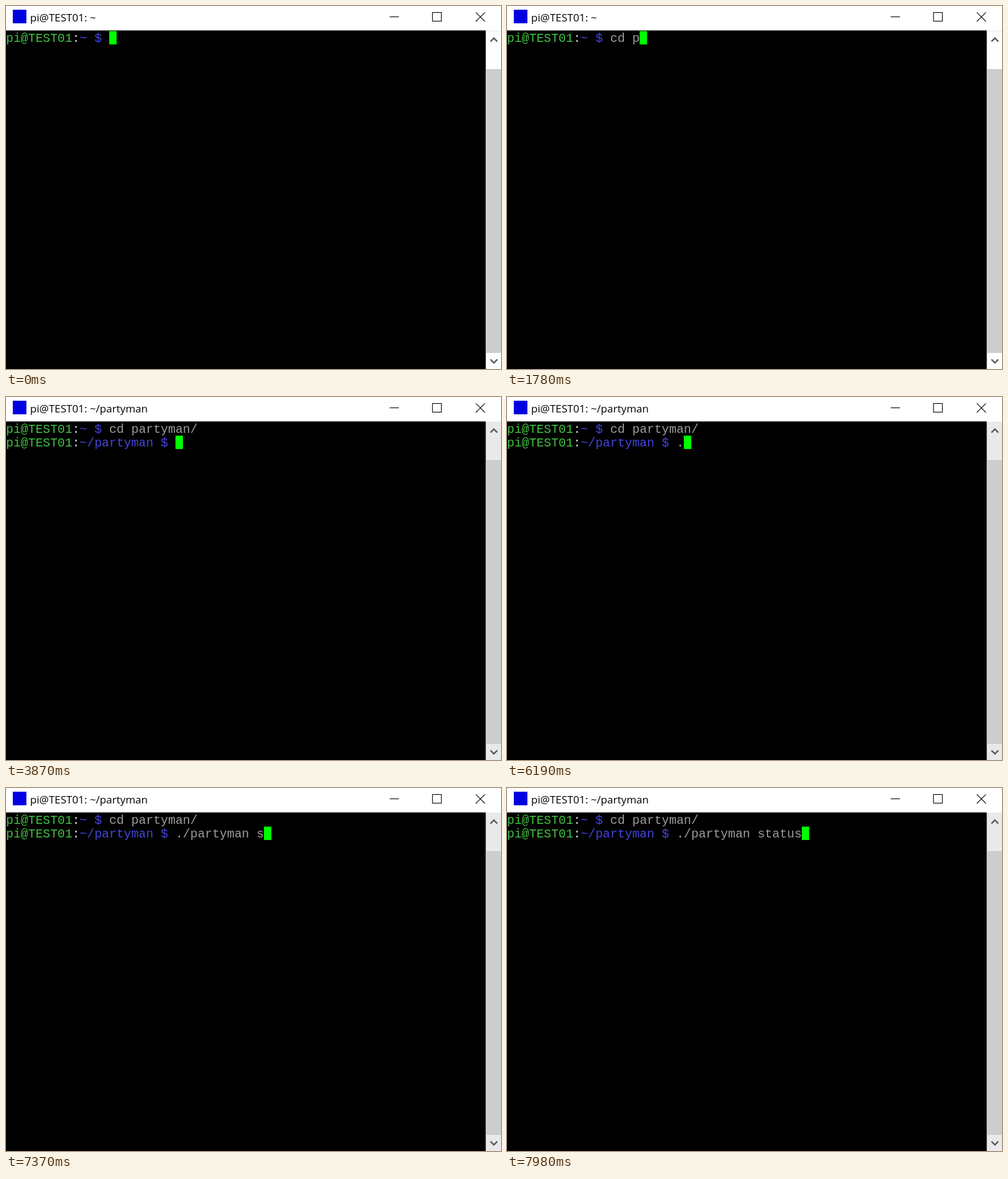
Animation, 800 px wide and 587 px high, one loop 8000 ms. Source, as an HTML page:

```html
<!DOCTYPE html>
<html lang="en">
<head>
<meta charset="utf-8">
<title>Terminal session</title>
<style>
  html, body { margin: 0; width: 100%; height: 100%; overflow: hidden; background: #fff; }
  svg { display: block; width: 800px; height: 587px; }
  text { white-space: pre; }
  .title { font: 17.1px "Open Sans", "Noto Sans", sans-serif; }
  .term { font: 19.85px "Liberation Mono", "Courier New", monospace; }
  .user { fill: #42c442; }
  .colon { fill: #d0d0d0; }
  .path { fill: #4444de; }
  .typed { fill: #9c9c9c; }
</style>
</head>
<body>
<svg viewBox="0 0 800 587">
  <rect width="800" height="587" fill="#fff"/>
  <rect x="11" y="6" width="22" height="22" fill="#0000e0"/>
  <text id="title" class="title" x="39" y="25"></text>
  <g fill="none" stroke="#000" stroke-width="1.1">
    <path d="M620 17.5H635"/>
    <rect x="689.3" y="10.5" width="14.3" height="14"/>
    <path d="M759.3 10.3L774 25M774 10.3L759.3 25"/>
  </g>
  <rect y="39.5" width="775.4" height="547.5"/>
  <rect id="track" x="776" y="40" width="24" height="547"/>
  <path d="M775.5 40.5H800" stroke="#e6e6e6"/>
  <rect x="776.3" y="102" width="23.7" height="459" fill="#cdcdcd"/>
  <path d="M783 57.5L788.5 52L794 57.5M783 571.5L788.5 577L794 571.5" fill="none" stroke="#555" stroke-width="2.4"/>
  <rect id="cursor" width="12" height="21.6" fill="#0f0"/>
  <text class="term" x="0" y="58"><tspan class="user"></tspan><tspan class="colon">:</tspan><tspan class="path"></tspan><tspan class="typed"></tspan></text>
  <text class="term" x="0" y="80"><tspan class="user"></tspan><tspan class="colon">:</tspan><tspan class="path"></tspan><tspan class="typed"></tspan></text>
</svg>
<script>
const LOOP = 8000, ENTER = 3870, CELL = 11.91, ROW = 21.9, TOP = 40.6;
const USER = "pi@TEST01";

// Each step: [time in ms, number of characters entered so far]
const lines = [
  { start: 0, dir: "~", command: "cd partyman/",
    steps: [[860, 2], [950, 3], [1780, 4], [1860, 5], [2100, 7], [3100, 8], [3560, 12]] },
  { start: ENTER, dir: "~/partyman", command: "./partyman status",
    steps: [[6190, 1], [6270, 2], [6420, 3], [6500, 4], [6570, 5], [6650, 6], [6880, 11],
            [7370, 12], [7520, 13], [7690, 14], [7750, 15], [7900, 16], [7980, 17]] }
];

const byId = id => document.getElementById(id);
const title = byId("title"), track = byId("track"), cursor = byId("cursor");
const rows = [...document.querySelectorAll(".term")];

rows.forEach((row, i) => {
  row.querySelector(".user").textContent = USER;
  row.querySelector(".path").textContent = lines[i].dir + " $ ";
});

const typedAt = (line, t) =>
  line.command.slice(0, line.steps.reduce((count, [time, n]) => t >= time ? n : count, 0));

function draw(t) {
  const active = t < ENTER ? 0 : 1;
  lines.forEach((line, i) => {
    rows[i].style.display = t >= line.start ? "" : "none";
    rows[i].querySelector(".typed").textContent = typedAt(line, t);
  });
  const line = lines[active];
  const column = `${USER}:${line.dir} $ ${typedAt(line, t)}`.length;
  cursor.setAttribute("x", column * CELL);
  cursor.setAttribute("y", TOP + active * ROW);
  title.textContent = `${USER}: ${line.dir}`;
  track.setAttribute("fill", active ? "#e9e9e9" : "#fefefe");
}

const begin = performance.now();
function tick() {
  draw((performance.now() - begin) % LOOP);
  requestAnimationFrame(tick);
}
tick();
</script>
</body>
</html>
```
